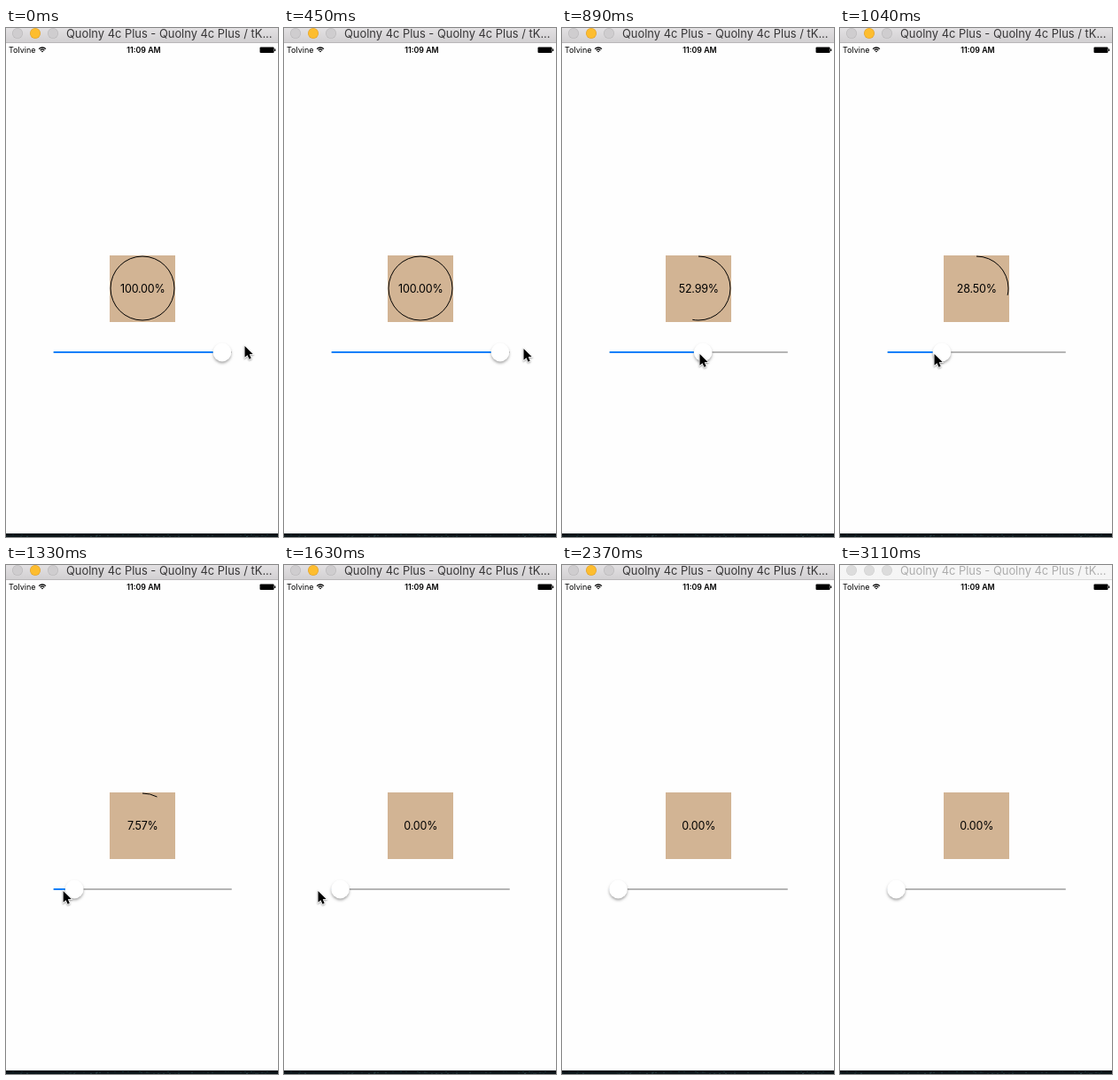
An HTML page with a canvas that plays this animation: 307 px wide and 573 px high, repeating every 3210 ms.

```html
<!DOCTYPE html>
<html lang="en">
<head>
<meta charset="utf-8">
<title>Progress ring</title>
<style>
  html, body { margin: 0; width: 100%; height: 100%; overflow: hidden; background: #fefefe; }
  canvas { display: block; width: 307px; height: 573px; }
</style>
</head>
<body>
<canvas id="stage"></canvas>
<script>
const W = 307, H = 573, LOOP = 3210;
const STEP = 148, RELEASE = 10, HIDE = 16, BLUR = 21;
const FONT = 'Inter, Roboto, sans-serif';
const canvas = document.getElementById('stage');
const ctx = canvas.getContext('2d');
const dpr = window.devicePixelRatio || 1;
canvas.width = W * dpr;
canvas.height = H * dpr;

// Pointer path: step, x, y
const path = [
  [0, 268, 357], [1, 275, 357], [3, 269, 360],
  [4, 221.62, 366], [6, 153.98, 366], [7, 105, 366], [9, 63.14, 366],
  [RELEASE, 48, 366], [11, 37, 366], [12, 37, 366],
  [13, 72, 400], [14, 235, 534], [15, 250, 546]
];

function pointerAt(step) {
  const i = path.findIndex(p => p[0] >= step);
  if (i < 0) return path.at(-1).slice(1);
  const [s1, ...b] = path[i];
  const [s0, ...a] = path[Math.max(i - 1, 0)];
  const u = s1 > s0 ? (step - s0) / (s1 - s0) : 1;
  return a.map((v, n) => v + (b[n] - v) * u);
}

// The slider follows the pointer until it is let go.
function percentAt(step) {
  const [x] = pointerAt(Math.min(step, RELEASE));
  return Math.min(100, Math.max(0, (x - 48) / 2));
}

function rect(x, y, w, h, color, r = 0) {
  ctx.fillStyle = color;
  ctx.beginPath();
  ctx.roundRect(x, y, w, h, r);
  ctx.fill();
}

function arc(x, y, r, from, to) {
  ctx.beginPath();
  ctx.arc(x, y, r, from, to);
  ctx.stroke();
}

function disc(x, y, r, color) {
  rect(x - r, y - r, 2 * r, 2 * r, color, r);
}

function label(text, x, y, size, color, align = 'left', weight = 400, spacing = 0) {
  ctx.font = `${weight} ${size}px ${FONT}`;
  ctx.letterSpacing = spacing + 'px';
  ctx.textAlign = align;
  ctx.fillStyle = color;
  ctx.fillText(text, x, y);
}

function shadow(color, blur, dy) {
  ctx.shadowColor = color;
  ctx.shadowBlur = blur * dpr;
  ctx.shadowOffsetY = dy * dpr;
}

function titleBar(active) {
  const fill = ctx.createLinearGradient(0, 0, 0, 16);
  fill.addColorStop(0, active ? '#e3e1e3' : '#f6f6f6');
  fill.addColorStop(1, active ? '#d2d0d2' : '#f5f5f5');
  rect(0, 0, W, 16, fill);
  rect(0, 16, W, 1, active ? '#b9b7b9' : '#dadada');
  for (let i = 0; i < 3; i++) {
    const x = 13 + 20 * i, lit = active && i === 1;
    disc(x, 6, 6, lit ? '#e0a02a' : active ? '#b9b7b9' : '#d0d0d0');
    disc(x, 6, 5.4, lit ? '#fdbd2f' : active ? '#cfcdcf' : '#dcdcdc');
  }
  label('Quolny 4c Plus - Quolny 4c Plus / tK...', 68, 11, 12.9,
    active ? '#373637' : '#adadad');
}

function statusBar() {
  label('Tolvine', 3, 28, 9, '#000');
  label('11:09 AM', 155.5, 28, 8.8, '#000', 'center', 600);
  ctx.strokeStyle = '#000';
  ctx.lineWidth = 1.3;
  for (let r = 1.1; r < 6; r += 2.2) {
    arc(41, 27.5, r, -Math.PI * 0.75, -Math.PI * 0.25);
  }
  rect(286.5, 21.5, 16, 6.5, '#000', 1);
  rect(303, 23.5, 1.2, 2.5, '#000');
}

function ring(percent) {
  rect(117, 256, 74, 75, '#d2b494');
  if (percent > 0) {
    ctx.strokeStyle = '#000';
    ctx.lineWidth = 1;
    arc(154, 293, 36, -Math.PI / 2, Math.PI * (percent / 50 - 0.5));
  }
  label(percent.toFixed(2) + '%', 154.3, 298, 12.5, '#000', 'center', 400, -0.2);
}

function slider(percent) {
  const x = 63.5 + percent * 1.805;
  rect(53.5, 364, 201.5, 2, '#b5b5b5', 1);
  rect(53.5, 364, x - 53.5, 2, '#0c80fa', 1);
  ctx.save();
  shadow('rgba(0,0,0,0.32)', 3, 2);
  disc(x, 365, 10.4, '#fff');
  ctx.restore();
}

function pointer(x, y) {
  ctx.save();
  ctx.translate(x + 1.5, y + 1);
  ctx.scale(0.93, 0.93);
  const shape = new Path2D('M0 0V13.8L3.2 10.9L5.4 15.9L7.7 14.9L5.6 10L9.8 9.7Z');
  ctx.lineWidth = 1.6;
  ctx.strokeStyle = '#fff';
  shadow('rgba(0,0,0,0.4)', 2, 1);
  ctx.stroke(shape);
  ctx.shadowColor = 'transparent';
  ctx.fillStyle = '#000';
  ctx.fill(shape);
  ctx.restore();
}

function desktop() {
  rect(0, 569, W, 4, '#0b1519');
  let seed = 7;
  const random = () => (seed = seed * 16807 % 2147483647) / 2147483647;
  for (let i = 0; i < 70; i++) {
    rect(Math.floor(random() * W), 570 + Math.floor(random() * 3), 2, 1,
      `rgba(45,75,80,${random() * 0.5})`);
  }
}

function draw(t) {
  const step = Math.floor((t + 6) / STEP);
  const percent = percentAt(step);
  ctx.setTransform(dpr, 0, 0, dpr, 0, 0);
  rect(0, 0, W, H, '#fefefe');
  titleBar(step < BLUR);
  statusBar();
  ring(percent);
  slider(percent);
  desktop();
  if (step < HIDE) pointer(...pointerAt(step));
}

const start = performance.now();
function tick() {
  draw((performance.now() - start) % LOOP);
  requestAnimationFrame(tick);
}
tick();
</script>
</body>
</html>
```
